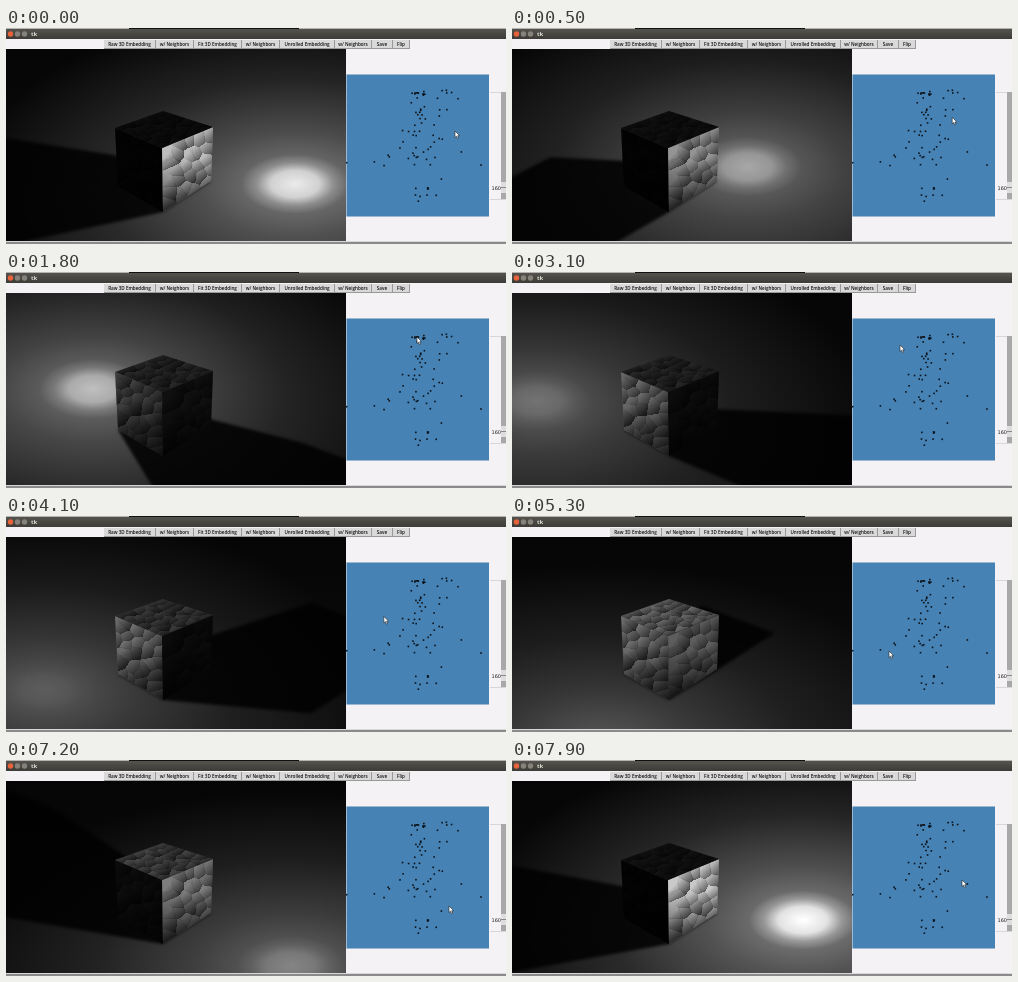
An HTML page with a canvas that plays this animation: 500x216 px, repeating every 8000 ms.

```html
<!DOCTYPE html>
<html lang="en">
<head>
<meta charset="utf-8">
<title>Light control</title>
<style>
  html, body { margin: 0; width: 500px; height: 216px; overflow: hidden; background: #f4f2f5; }
  canvas { position: absolute; left: 0; top: 0; }
  span { position: absolute; white-space: nowrap; color: #222; }
  .button {
    top: 12px; height: 9px; box-sizing: border-box; text-align: center;
    font: 600 4.6px/8px "Open Sans", "Noto Sans", sans-serif; color: #111;
    background: #d9d9d9; border: solid #999; border-width: 0 1px 1px 0;
  }
  #title { left: 25px; top: 2px; font: bold 6px/8px "Open Sans", sans-serif; color: #dfdbd2; }
  #value { left: 485.5px; top: 156px; font: 5px/8px "DejaVu Sans", sans-serif; }
</style>
</head>
<body>
<canvas id="stage" width="500" height="216"></canvas>
<span id="title">tk</span>
<span id="value">160</span>
<script>
const ctx = document.getElementById('stage').getContext('2d');
const LOOP = 8000, STEP = 100;

const labels = ['Raw 3D Embedding', 'w/ Neighbors', 'Fit 3D Embedding', 'w/ Neighbors',
  'Unrolled Embedding', 'w/ Neighbors', 'Save', 'Flip'];
const edges = [98, 150, 188, 236, 274, 329, 366, 387, 404];
labels.forEach((text, i) => {
  const button = document.createElement('span');
  button.className = 'button';
  button.textContent = text;
  button.style.left = edges[i] + 'px';
  button.style.width = edges[i + 1] - edges[i] + 'px';
  document.body.append(button);
});

// time, pointer x y, light spot x y, shadow reach, highlight
const keys = [
  [0,    449, 103, 289, 156, 3,   110],
  [1200, 425, 68,  147, 113, 1.9, 0],
  [1800, 411, 65,  87,  117, 3,   80],
  [3100, 388, 73,  25,  129, 3,   25],
  [5300, 377, 135, 90,  225, 1.5, 0],
  [7200, 443, 146, 285, 206, 3,   35],
  [7900, 450, 120, 291, 160, 3,   125]
];

// Cube corners: left, back, right, front
const top4 = [[109, 100], [157, 83], [207, 99], [156, 120]];
const base = [[112, 158], [157, 135], [205, 153], [157, 184]];
const faces = [
  { quad: [top4[0], top4[3], base[3], base[0]], cells: 5, squash: 1 },
  { quad: [top4[3], top4[2], base[2], base[3]], cells: 5, squash: 1 },
  { quad: top4, cells: 6, squash: 2 }
];

let seed = 11;
const random = () => (seed = seed * 16807 % 2147483647) / 2147483647;
const spread = () => random() + random() + random() - 1.5;
const clamp = (v, low, high) => Math.max(low, Math.min(high, v));
const gray = (v, a = 1) => `rgba(${v},${v},${v},${a})`;

// A dense head, a column below it and a loose cloud around both
const dots = Array.from({ length: 76 }, (_, i) =>
  i < 12 ? [412 + spread() * 8, 66 + spread() * 4] :
  i < 34 ? [411 + spread() * 10, 68 + random() * 62] :
  i < 44 ? [435 + spread() * 14, 62 + random() * 35] :
  i < 66 ? [413 + spread() * 64, 107 + random() * 34] :
  [417 + spread() * 24, 148 + random() * 26]);

function rect(color, x, y, w, h) {
  ctx.fillStyle = color;
  ctx.fillRect(x, y, w, h);
}

function disc(color, x, y, r) {
  ctx.fillStyle = color;
  ctx.beginPath();
  ctx.arc(x, y, r, 0, 7);
  ctx.fill();
}

function trace(points) {
  ctx.beginPath();
  points.forEach(([x, y]) => ctx.lineTo(x, y));
  ctx.closePath();
}

function verticalFade(y0, y1, from, to) {
  const fade = ctx.createLinearGradient(0, y0, 0, y1);
  fade.addColorStop(0, from);
  fade.addColorStop(1, to);
  return fade;
}

// Cellular relief, stored as a black layer of varying opacity
function makeTexture({ quad: [a, b, c, d], cells, squash }) {
  const size = 106, layer = document.createElement('canvas');
  layer.width = layer.height = size;
  const pen = layer.getContext('2d'), image = pen.createImageData(size, size), centers = [];
  for (let i = 0; i < cells * cells; i++) {
    const u = (i % cells + random()) / cells, v = (Math.floor(i / cells) + random()) / cells;
    const blend = k => (a[k] * (1 - u) + b[k] * u) * (1 - v) + (d[k] * (1 - u) + c[k] * u) * v;
    centers.push([blend(0) - 105, blend(1) - 80, random()]);
  }
  for (let i = 0; i < size * size; i++) {
    const x = i % size, y = Math.floor(i / size);
    let near = 1e9, next = 1e9, shade = 0;
    for (const [px, py, tone] of centers) {
      const dx = x - px, dy = (y - py) * squash, dist = Math.hypot(dx, dy);
      if (dist < near) {
        next = near;
        near = dist;
        shade = 0.14 + tone * 0.25 + (dx + dy) * 0.028;
      } else if (dist < next) next = dist;
    }
    if (next - near < 1) shade += 0.06;
    image.data[i * 4 + 3] = 255 * clamp(shade, 0, 0.7);
  }
  pen.putImageData(image, 0, 0);
  return layer;
}
faces.forEach(face => face.texture = makeTexture(face));

function hull(points) {
  const sorted = [...points].sort((p, q) => p[0] - q[0] || p[1] - q[1]);
  const half = list => {
    const out = [];
    for (const p of list) {
      while (out.length > 1) {
        const [o, q] = out.slice(-2);
        if ((q[0] - o[0]) * (p[1] - o[1]) - (q[1] - o[1]) * (p[0] - o[0]) > 0) break;
        out.pop();
      }
      out.push(p);
    }
    return out.slice(0, -1);
  };
  return [...half(sorted), ...half(sorted.reverse())];
}

// Catmull-Rom through the key points
function stateAt(t) {
  const last = keys.length - 1;
  let i = 0;
  while (i < last - 1 && t >= keys[i + 1][0]) i++;
  const p = keys[Math.max(0, i - 1)], a = keys[i], b = keys[i + 1], n = keys[Math.min(last, i + 2)];
  const u = Math.min(1, (t - a[0]) / (b[0] - a[0]));
  return a.map((v, k) => v + u / 2 * (b[k] - p[k] +
    u * (2 * p[k] - 5 * v + 4 * b[k] - n[k] + u * (3 * (v - b[k]) + n[k] - p[k]))));
}

function glow(x, y, radius, level, stops) {
  ctx.save();
  ctx.globalCompositeOperation = 'lighter';
  ctx.translate(x, y);
  ctx.scale(1, 0.55);
  const fill = ctx.createRadialGradient(0, 0, 0, 0, 0, radius);
  stops.forEach(([at, share]) => fill.addColorStop(at, gray(Math.round(level * share))));
  disc(fill, 0, 0, radius);
  ctx.restore();
}

// Brightness of the left, right and top faces
function faceTones(x, y, core) {
  const dx = x - 157, dy = y - 155;
  const left = 110 * clamp((1.2 * dy - dx + 90) / 200, 0.04, 1);
  const right = (95 + 0.85 * core) * clamp((1.2 * dy + dx + 110) / 130, 0.1, 1);
  const shine = 175 * Math.exp(-(dx * dx + (y - 100) ** 2) / 2000);
  return [left, right, 12 + shine + 1.1 * Math.max(0, dy) + 0.2 * Math.max(0, -dx)];
}

function drawScene(x, y, reach, core) {
  core = Math.max(0, core);
  ctx.save();
  ctx.beginPath();
  ctx.rect(0, 21, 340, 192);
  ctx.clip();
  rect(verticalFade(22, 213, gray(5), gray(14)), 0, 21, 340, 192);
  glow(x, y, 320, 70 + 0.4 * core, [[0, 1], [0.15, 0.82], [0.3, 0.58], [0.6, 0.25], [1, 0]]);
  glow(x, y, 54, core, [[0, 1], [0.45, 0.85], [0.72, 0.3], [1, 0]]);

  const cast = base.map(([bx, by]) => [x + (bx - x) * reach, y + (by - y) * reach]);
  ctx.filter = 'blur(1.5px)';
  ctx.fillStyle = gray(2, 0.88);
  trace(hull([...base, ...cast]));
  ctx.fill();
  ctx.filter = 'none';

  const tones = faceTones(x, y, core);
  faces.forEach(({ quad, texture }, i) => {
    ctx.save();
    trace(quad);
    ctx.fillStyle = gray(Math.round(clamp(tones[i], 4, 225)));
    ctx.fill();
    ctx.clip();
    ctx.drawImage(texture, 105, 80);
    if (i < 2) rect(verticalFade(130, 182, gray(0, 0), gray(0, 0.6)), 105, 80, 106, 106);
    ctx.restore();
  });
  ctx.restore();
}

function drawWindow() {
  rect('#f4f2f5', 0, 0, 500, 216);
  rect('#b5b3b0', 0, 0, 500, 1);
  rect('#111', 123, 0, 170, 1);
  rect(verticalFade(1, 11, '#55534d', '#3c3b37'), 0, 1, 500, 10);
  ['#e8623a', '#85827a', '#85827a'].forEach((color, i) => disc(color, 4.5 + i * 7, 6, 2.7));
  rect('#4682b4', 340.5, 46.5, 142.5, 142);
  rect('#d8d6d9', 484, 64, 11, 1);
  rect('#d8d6d9', 484, 171, 16, 1);
  rect('#a8a8a8', 495, 64, 5, 107);
  rect('#dedede', 495, 154, 5, 11);
  rect('#888', 495, 159, 5, 1);
  rect('#d8d6d8', 0, 213, 500, 1);
  rect('#8a8a8a', 0, 214, 500, 2);
  dots.forEach(([x, y]) => rect('#0b1118', x - 0.8, y - 0.8, 1.6, 1.6));
}

function drawPointer(x, y) {
  const shape = [[0, 0], [0, 6.5], [1.5, 5.2], [2.6, 7.7], [3.7, 7.2], [2.7, 4.8], [4.6, 4.6]];
  trace(shape.map(([dx, dy]) => [x + dx, y + dy]));
  ctx.fillStyle = '#fff';
  ctx.fill();
  ctx.strokeStyle = '#222';
  ctx.lineWidth = 0.6;
  ctx.stroke();
}

const start = performance.now();
function frame() {
  const t = Math.floor((performance.now() - start) % LOOP / STEP) * STEP;
  const [, pointerX, pointerY, ...light] = stateAt(t);
  drawWindow();
  drawScene(...light);
  drawPointer(pointerX, pointerY);
  requestAnimationFrame(frame);
}
frame();
</script>
</body>
</html>
```
